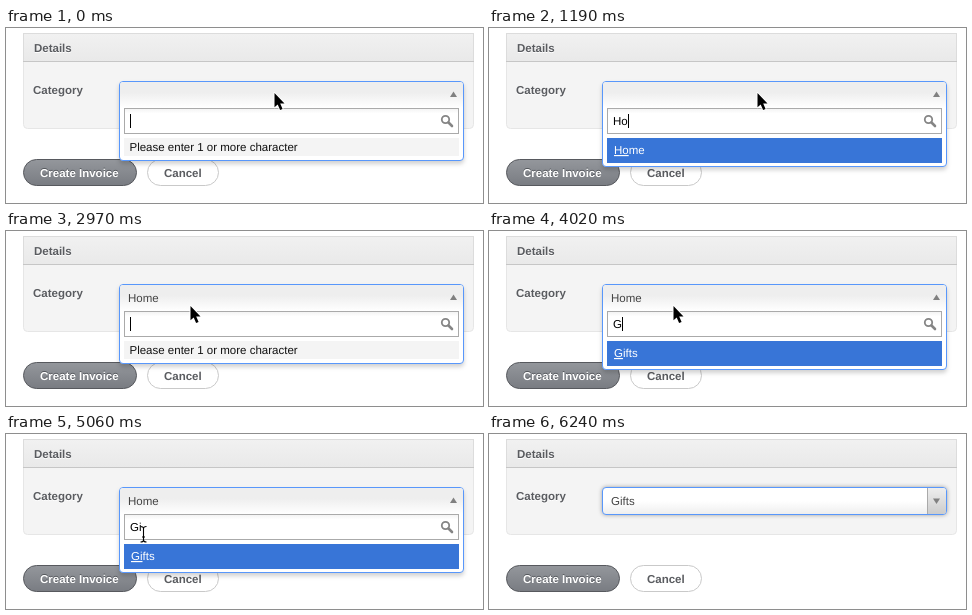
Animation of 477x175 px, one loop 6680 ms. Source, as an HTML page:

```html
<!DOCTYPE html>
<html lang="en">
<head>
<meta charset="utf-8">
<title>Category picker</title>
<style>
  html, body { margin: 0; width: 100%; height: 100%; overflow: hidden; background: #fff; }
  svg { display: block; width: 477px; height: 175px; }
  text { font: 11.5px "Liberation Sans", Arial, sans-serif; text-rendering: geometricPrecision; white-space: pre; }
  .bold { font-weight: bold; fill: #5a5c60; }
  .emboss { text-shadow: 0 1px 0 #fff; }
  .match { text-decoration: underline; }
  .glow { filter: drop-shadow(0 0 2px rgba(0, 0, 0, .35)); }
  .drop { filter: drop-shadow(0 3px 2px rgba(0, 0, 0, .18)); }
</style>
</head>
<body>
<svg viewBox="0 0 477 175">
  <defs>
    <linearGradient id="header" x2="0" y2="1"><stop stop-color="#f1f1f1"/><stop offset="1" stop-color="#e9e9e9"/></linearGradient>
    <linearGradient id="dark" x2="0" y2="1"><stop stop-color="#94979c"/><stop offset="1" stop-color="#797c82"/></linearGradient>
    <linearGradient id="closedFill" x2="0" y2="1"><stop offset=".5" stop-color="#fff"/><stop offset="1" stop-color="#eee"/></linearGradient>
    <linearGradient id="openFill" x2="0" y2="1"><stop offset=".4" stop-color="#eee"/><stop offset="1" stop-color="#fff"/></linearGradient>
    <linearGradient id="arrowFill" x2="0" y2="1"><stop stop-color="#eee"/><stop offset="1" stop-color="#ccc"/></linearGradient>
    <linearGradient id="searchFill" x2="0" y2="1"><stop stop-color="#f3f3f3"/><stop offset=".2" stop-color="#fff"/></linearGradient>
  </defs>

  <path d="M17.5 34V96.500a4 4 0 0 0 4 4H463.500a4 4 0 0 0 4-4V34" fill="#f4f4f4" stroke="#e6e6e6"/>
  <rect x="17.500" y="5.500" width="450" height="28" fill="url(#header)" stroke="#dcdcdc"/>
  <path d="M17 33.500H468" stroke="#c6c6c6"/>
  <text class="bold emboss" x="28" y="24">Details</text>
  <text class="bold emboss" x="27" y="66">Category</text>

  <rect x="17.500" y="131.500" width="113" height="26" rx="13" fill="url(#dark)" stroke="#57595e"/>
  <text class="bold" x="34" y="149" style="fill:#fff;text-shadow:0 -1px 0 #55585d">Create Invoice</text>
  <rect x="141.500" y="131.500" width="71" height="26" rx="13" fill="#fff" stroke="#c9c9c9"/>
  <text class="bold" x="158" y="149">Cancel</text>

  <g id="closed">
    <rect class="glow" x="113.500" y="53.500" width="344" height="27" rx="3.500" fill="url(#closedFill)" stroke="#5897fb"/>
    <path d="M439 54H454a3 3 0 0 1 3 3V77a3 3 0 0 1-3 3H439Z" fill="url(#arrowFill)"/>
    <path d="M438.500 54V80" stroke="#aaa"/>
    <path d="M444 64.500h7l-3.500 5.500Z" fill="#808080"/>
  </g>

  <g id="open">
    <path id="frame" class="drop" fill="#fff" stroke="#5897fb"/>
    <path d="M114 80V57a3 3 0 0 1 3-3H454a3 3 0 0 1 3 3V80Z" fill="url(#openFill)"/>
    <path d="M444 69h7l-3.500-5.500Z" fill="#808080"/>
    <rect x="118.500" y="80.500" width="334" height="25" fill="url(#searchFill)" stroke="#aaa"/>
    <g id="lens" fill="none" stroke="#858585">
      <circle cx="439.500" cy="91.500" r="3.700" stroke-width="1.800"/>
      <path d="M442.500 94.500L446 98" stroke-width="2.600" stroke-linecap="round"/>
    </g>
    <circle id="spinner" cx="441" cy="93" r="5" fill="none" stroke="#aaa" stroke-width="4" stroke-dasharray="1.300 1.318"/>
    <text id="query" x="124" y="97"></text>
    <rect id="caret" y="86" width="1" height="14"/>
    <rect id="row" x="118" y="110" width="335"/>
    <text id="label"><tspan id="matched" class="match"></tspan><tspan id="rest"></tspan></text>
  </g>
  <text id="value" x="122" y="71" fill="#444"></text>

  <g id="pointer" stroke-linejoin="round">
    <path id="arrow" d="M.5 0V14.300L3.700 11.400L6.100 16.900L8.600 15.900L6.200 10.500H10.500Z" stroke="#fff" paint-order="stroke" stroke-width="1.800"/>
    <g id="hand" stroke="#000" stroke-width="1.100">
      <path fill="#fff" d="M-2.800 1.200C-2.800-.8 0-.8 0 1.200L1 6C1.300 4.700 3.500 4.800 3.700 6.500C4.300 5.500 6.200 5.800 6.400 7.300C7.200 6.500 8.800 7.100 8.800 8.700C8.900 12 8.200 13 7.200 14.500V17H0V15C-1.500 12.500-3.200 11-4.300 9.500C-5.200 8-3.300 7.200-2 8.600L-1.200 9.500Z"/>
      <path d="M1.500 11v3.500M3.700 11v3.500M5.800 11v3.500"/>
    </g>
    <path id="beam" d="M-3-7.500Q0-7.500 0-5.500Q0-7.500 3-7.500M0-5.500V6M-3 8Q0 8 0 6Q0 8 3 8M-1.500 3H1.500" fill="none" stroke="#000" stroke-width="1.100"/>
  </g>
</svg>
<script>
const LOOP = 6680;
const HINT = "Please enter 1 or more character";
const SEARCHING = "Searching...";
const el = id => document.getElementById(id);
const show = (id, on) => el(id).style.display = on ? "" : "none";
const at = (pointer, x, y) => ({ pointer, x, y });

// A message row is plain grey; a choice row underlines the part already matched.
const message = label => ({ label, choice: false, matched: 0, active: false });
const choice = (label, matched, active = true) => ({ label, choice: true, matched, active });
const opened = { open: true, query: "", caret: true, busy: false, ...message(HINT) };

// Each step lists only what changes from the one before.
const steps = [
  [0, { value: "", ...opened, ...at("arrow", 268, 65) }],
  [150, { caret: false }],
  [450, { query: "H", caret: true, busy: true, ...message(SEARCHING) }],
  [600, { busy: false, ...choice("Home", 1) }],
  [1040, { query: "Ho", busy: true, ...choice("Home", 1, false) }],
  [1190, { busy: false, ...choice("Home", 2) }],
  [1640, { open: false, value: "Home" }],
  [2540, at("hand", 268.5, 65.5)],
  [2680, at("hand", 232, 68)],
  [2830, at("hand", 185, 75)],
  [2970, { ...opened, ...at("arrow", 184, 75) }],
  [3420, { caret: false }],
  [3870, { query: "G", caret: true, busy: true, ...message(SEARCHING) }],
  [4020, { busy: false, ...choice("Gifts", 1) }],
  [4160, { query: "Gi", busy: true, ...choice("Gifts", 1, false) }],
  [4310, { busy: false, ...choice("Gifts", 2) }],
  [4760, { caret: false, ...at("arrow", 179, 77) }],
  [4910, at("beam", 154, 92)],
  [5060, at("beam", 137.5, 100)],
  [5210, { caret: true, ...at("hand", 137, 117) }],
  [5360, at("hand", 138, 119)],
  [5500, { open: false, value: "Gifts", ...at("arrow", 139, 118) }],
  [5650, at("arrow", 147, 109)],
  [5950, at("arrow", 168, 111)],
  [6100, at("arrow", 193, 115)],
  [6240, { pointer: "" }],
];

function stateAt(time) {
  return Object.assign({}, ...steps.filter(([start]) => start <= time).map(([, change]) => change));
}

function draw(s) {
  show("open", s.open);
  show("closed", !s.open);
  el("value").textContent = s.value;

  const bottom = s.choice ? 138.5 : 132.5;
  el("frame").setAttribute("d",
    `M113.500 57a3.500 3.500 0 0 1 3.500-3.500H454a3.500 3.500 0 0 1 3.500 3.500V${bottom - 3.5}` +
    `a3.500 3.500 0 0 1-3.500 3.500H117a3.500 3.500 0 0 1-3.500-3.500Z`);

  el("query").textContent = s.query;
  const width = s.open && s.query ? el("query").getComputedTextLength() : 0;
  el("caret").setAttribute("x", Math.round(124 + width));
  show("caret", s.caret);
  show("lens", !s.busy);
  show("spinner", s.busy);

  el("row").setAttribute("height", s.choice ? 25 : 18);
  el("row").setAttribute("fill", s.active ? "#3875d7" : s.choice ? "#fff" : "#f4f4f4");
  const label = el("label");
  label.setAttribute("x", s.choice ? 125 : 123.5);
  label.setAttribute("y", s.choice ? 126 : 123);
  label.setAttribute("fill", s.active ? "#fff" : "#111");
  el("matched").textContent = s.label.slice(0, s.matched);
  el("rest").textContent = s.label.slice(s.matched);

  for (const shape of ["arrow", "hand", "beam"]) show(shape, s.pointer === shape);
  el("pointer").setAttribute("transform", `translate(${s.x} ${s.y})`);
}

function tick() {
  draw(stateAt(performance.now() % LOOP));
  requestAnimationFrame(tick);
}
tick();
</script>
</body>
</html>
```
